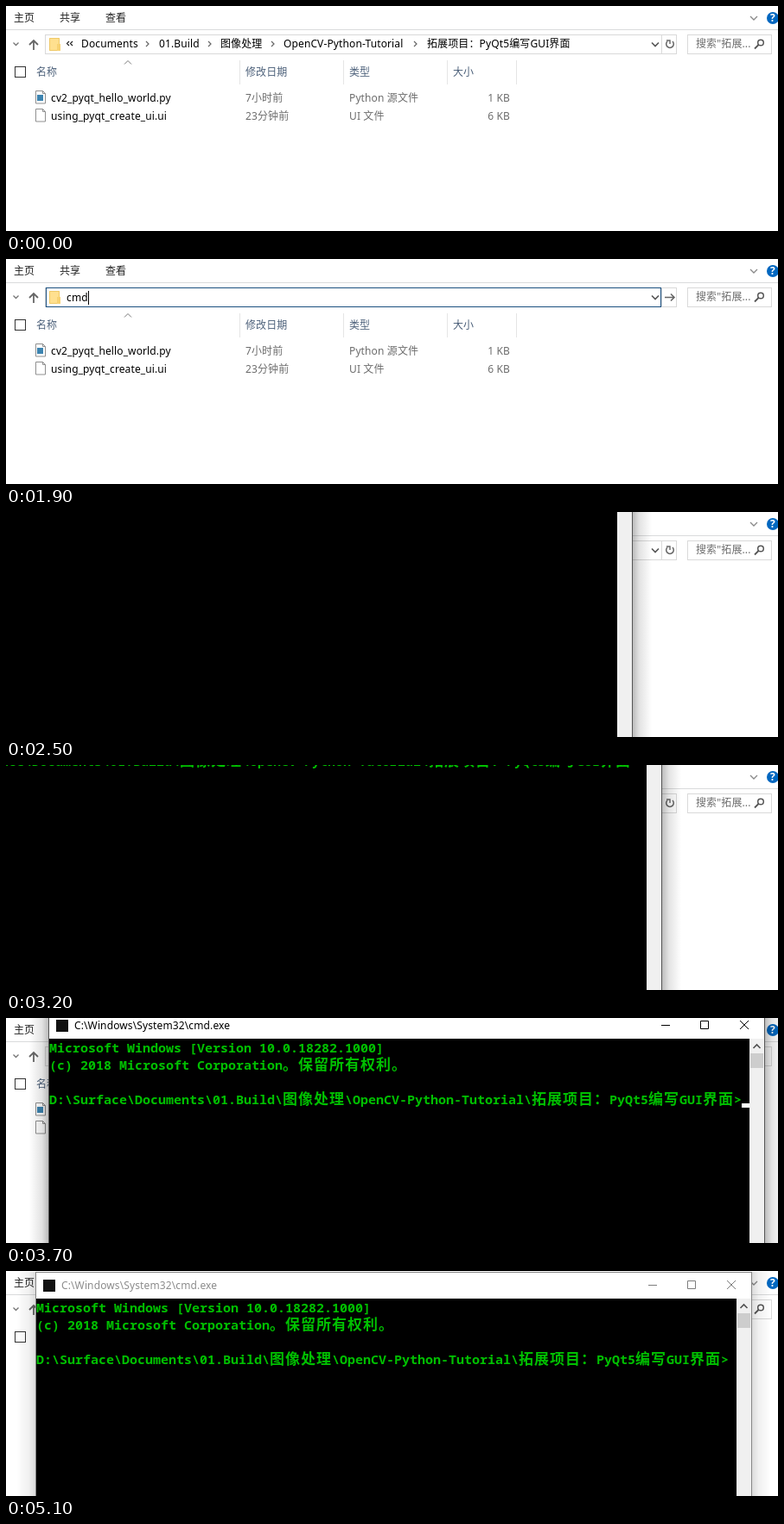
These frames come from a looping animation (893x261 px, 5.2 s). An HTML page:

```html
<!DOCTYPE html>
<html lang="zh-CN">
<head>
<meta charset="utf-8">
<title>Open a prompt from the address bar</title>
<style>
html, body { margin: 0; width: 100%; height: 100%; overflow: hidden; background: #fff; }
svg { display: block; }
text { font: 12px 'Noto Sans', 'Noto Sans CJK SC', 'Noto Sans CJK', sans-serif; letter-spacing: .12px; white-space: pre; }
.con { font: bold 15px 'Noto Sans Mono', 'Liberation Mono', monospace; letter-spacing: 0; fill: #00c000; }
.han { font: bold 17px 'Noto Sans CJK SC', 'Noto Sans CJK', sans-serif; letter-spacing: 1px; }
</style>
</head>
<body>
<svg id="stage" width="893" height="261" viewBox="0 0 893 261">
  <defs>
    <linearGradient id="shade">
      <stop offset="0" stop-color="#000" stop-opacity=".26"/>
      <stop offset=".35" stop-color="#000" stop-opacity=".11"/>
      <stop offset="1" stop-color="#000" stop-opacity="0"/>
    </linearGradient>
  </defs>
</svg>
<script>
const LOOP = 5200;
const stage = document.getElementById('stage');

function add(parent, tag, attrs = {}, content) {
  const el = document.createElementNS('http://www.w3.org/2000/svg', tag);
  for (const key in attrs) el.setAttribute(key, attrs[key]);
  if (content !== undefined) el.textContent = content;
  parent.appendChild(el);
  return el;
}
const group = parent => add(parent, 'g');
const rect = (p, x, y, width, height, fill, stroke = 'none') =>
  add(p, 'rect', { x, y, width, height, fill, stroke });
const label = (p, x, y, str, fill = '#000', anchor = 'start') =>
  add(p, 'text', { x, y, fill, 'text-anchor': anchor }, str);
const line = (p, d, stroke, width = 1) =>
  add(p, 'path', { d, stroke, 'stroke-width': width, fill: 'none' });
const show = (el, on) => el.setAttribute('display', on ? 'inline' : 'none');

// Explorer
const GREY = '#6d6d6d', EDGE = '#d9d9d9', HEAD = '#4c607a';
const explorer = group(stage);
rect(explorer, 0, 0, 893, 261, '#fff');
[[9, '主页'], [62, '共享'], [115, '查看']].forEach(([x, s]) => label(explorer, x, 18, s, '#222'));
line(explorer, 'M0 27.5H893', '#dadbdc');
line(explorer, 'M861 12l4 4 4-4', '#8a8a8a', 1.3);
add(explorer, 'circle', { cx: 887, cy: 14, r: 7, fill: '#0067c0' });
label(explorer, 887, 18, '?', '#fff', 'middle').style.fontWeight = 'bold';

line(explorer, 'M8.500 42.500l3 3 3-3', '#777', 1.3);
line(explorer, 'M32 51V40M27 45l5-5 5 5', '#666', 1.8);
rect(explorer, 45.5, 33.5, 730, 22, '#fff', EDGE);
line(explorer, 'M758.500 34V55', EDGE);
const focusBox = rect(explorer, 46.5, 33.5, 711, 22, '#fff', '#1a4f7f');
rect(explorer, 50, 37, 12, 15, '#ffe08f');
line(explorer, 'M50.500 37.500H61.500V51.500H50.500Z', '#efc968');
rect(explorer, 59, 44, 4, 8, '#f7d273');
line(explorer, 'M747 42.500l4 4 4-4', '#555', 1.6);

const refresh = group(explorer);
line(refresh, 'M771 41a4.300 4.300 0 1 1-6 0', '#666', 1.5);
line(refresh, 'M764 40h4v4', '#666', 1.4);
const go = line(explorer, 'M762 44.500H773M769 40.500l4 4-4 4', '#666', 1.6);

const crumbs = group(explorer);
line(crumbs, 'M73 41l-2.500 2.500 2.500 2.500M77 41l-2.500 2.500 2.500 2.500', '#222', 1.2);
[[87, 'Documents'], [177, '01.Build'], [248, '图像处理'], [321, 'OpenCV-Python-Tutorial'],
 [487, '拓展项目：PyQt5编写GUI界面']].forEach(([x, s]) => label(crumbs, x, 48, s));
[162, 234, 307, 472].forEach(x => line(crumbs, `M${x} 41l3 3-3 3`, '#666', 1.2));

const FOLDER = 'D:\\Surface\\Documents\\01.Build\\图像处理\\OpenCV-Python-Tutorial\\拓展项目：PyQt5编写GUI界面';
const CMD = 'C:\\Windows\\System32\\cmd.exe';
const mark = rect(explorer, 70, 37, 550, 16, '#0078d7');
const address = label(explorer, 70, 48.5, '');
const beam = rect(explorer, 70, 37, 1, 16, '#000');

rect(explorer, 788.5, 33.5, 97, 22, '#fff', EDGE);
label(explorer, 798, 48, '搜索"拓展...', GREY);
add(explorer, 'circle', { cx: 873, cy: 42.5, r: 3.3, fill: 'none', stroke: '#555', 'stroke-width': 1.5 });
line(explorer, 'M870.500 45l-4.500 4.500', '#555', 1.8);

rect(explorer, 10.5, 70.5, 12, 12, '#fff', '#333');
line(explorer, 'M137 67.500l4-4 4 4', '#777');
[[35, '名称'], [277, '修改日期'], [397, '类型'], [517, '大小']]
  .forEach(([x, s]) => label(explorer, x, 81, s, HEAD));
[270, 390, 510, 590].forEach(x => line(explorer, `M${x}.5 63V91`, '#e5e5e5'));
[['cv2_pyqt_hello_world.py', '7小时前', 'Python 源文件', '1 KB'],
 ['using_pyqt_create_ui.ui', '23分钟前', 'UI 文件', '6 KB']].forEach(([name, date, type, size], i) => {
  const y = 111 + 21 * i;
  line(explorer, `M34.500 ${y - 12.5}h8l3 3v11.500h-11z`, '#8f8f8f');
  line(explorer, `M42.500 ${y - 12.5}v3h3`, '#8f8f8f');
  if (!i) rect(explorer, 36, y - 8, 7, 7, '#3d84b0');
  label(explorer, 52, y, name);
  label(explorer, 277, y, date, GREY);
  label(explorer, 397, y, type, GREY);
  label(explorer, 583, y, size, GREY, 'end');
});

const list = group(explorer);
const listBox = rect(list, 70.5, 55.5, 670, 92, '#fff', '#a0a0a0');
label(list, 73, 69, 'cmd');

// Console window, with its client area starting at 1,0
const W = 828, H = 500;
const win = group(stage);
const shadow = group(win);
rect(shadow, W + 1, -31, 22, H + 31, 'url(#shade)');
rect(shadow, 0, -31, 22, H + 31, 'url(#shade)').setAttribute('transform', 'scale(-1 1)');
rect(win, 0, -31, W + 1, H + 31, '#fff');
rect(win, 1, 0, 810, H, '#000');
rect(win, 811, 0, 17, H, '#f0f0f0');
rect(win, 812, 17, 15, 17, '#cdcdcd');
line(win, 'M815.500 11l4-4 4 4', '#505050', 1.6);
rect(win, 9, -22, 14, 14, '#111');
const title = label(win, 30, -11, CMD);
const buttons = line(win,
  'M709 -15.500h10M754.500 -20.500h9v9h-9zM800 -21l10 10M810 -21l-10 10', '#000');
const frame = rect(win, .5, -30.5, W, H + 31, 'none', '#555');

[[16, 'Microsoft Windows [Version 10.0.18282.1000]'],
 [36, '(c) 2018 Microsoft Corporation。保留所有权利。'],
 [76, FOLDER + '>']].forEach(([y, str]) => {
  const row = add(win, 'text', { x: 1, y, class: 'con' });
  for (const run of str.match(/[ -~]+|[^ -~]+/g))
    add(row, 'tspan', run.charCodeAt(0) > 127 ? { class: 'han' } : {}, run);
});
const cursor = rect(win, 802, 75, 9, 5, '#fff');

// [time, value...] tables; the last row not later than t applies
const TYPED = [[0, ''], [700, FOLDER], [1400, 'c'], [1500, 'cm'], [1600, 'cmd'], [2100, CMD], [2500, '']];
const PLACE = [
  [0, -104, -105], [3200, -70, -75], [3300, -32, -41], [3400, 4, -11], [3500, 25, 5], [3600, 40, 17],
  [3700, 49, 24], [3800, 46, 26], [3900, 41, 29], [4000, 37, 31], [4100, 34, 32]
];
const OPENING = [[0, .971, .41], [2400, .99, .8], [2500, 1, 1]];
const at = (table, t) => table.findLast(row => row[0] <= t);
const within = (t, from, to) => t >= from && t < to;

function draw(now) {
  const t = Math.floor(now % LOOP / 100) * 100;

  const editing = within(t, 700, 2500), selected = within(t, 700, 1400);
  const typing = within(t, 1400, 2500);
  show(crumbs, !editing);
  show(focusBox, editing);
  show(refresh, !typing);
  show(go, typing);
  show(mark, selected);
  show(beam, typing);
  const text = at(TYPED, t)[1];
  if (address.textContent !== text) address.textContent = text;
  address.setAttribute('fill', selected ? '#fff' : '#000');
  if (editing) {
    const width = address.getComputedTextLength();
    mark.setAttribute('width', Math.round(width));
    beam.setAttribute('x', t < 2100 ? Math.round(70 + width) : 70);
  }
  show(list, within(t, 1400, 1900));
  listBox.setAttribute('height', t < 1700 ? 92 : 74);

  show(win, t >= 2300);
  const [, x, y] = at(PLACE, t), [, scale, alpha] = at(OPENING, t);
  const cx = W / 2, cy = H / 2;
  win.setAttribute('transform',
    `translate(${x} ${y}) translate(${cx} ${cy}) scale(${scale}) translate(${-cx} ${-cy})`);
  win.setAttribute('opacity', alpha);
  show(cursor, within(t, 3600, 4100) || within(t, 4600, 5100));

  // focus fades away at the end
  const fade = Math.max(0, Math.min(1, (t - 4500) / 600));
  const tone = (from, to) => `rgb(${Array(3).fill(Math.round(from + (to - from) * fade))})`;
  title.setAttribute('fill', tone(0, 140));
  buttons.setAttribute('stroke', tone(0, 125));
  frame.setAttribute('stroke', tone(85, 135));
  shadow.setAttribute('opacity', 1 - .45 * fade);
}

const start = performance.now();
function tick() {
  draw(performance.now() - start);
  requestAnimationFrame(tick);
}
tick();
</script>
</body>
</html>
```
